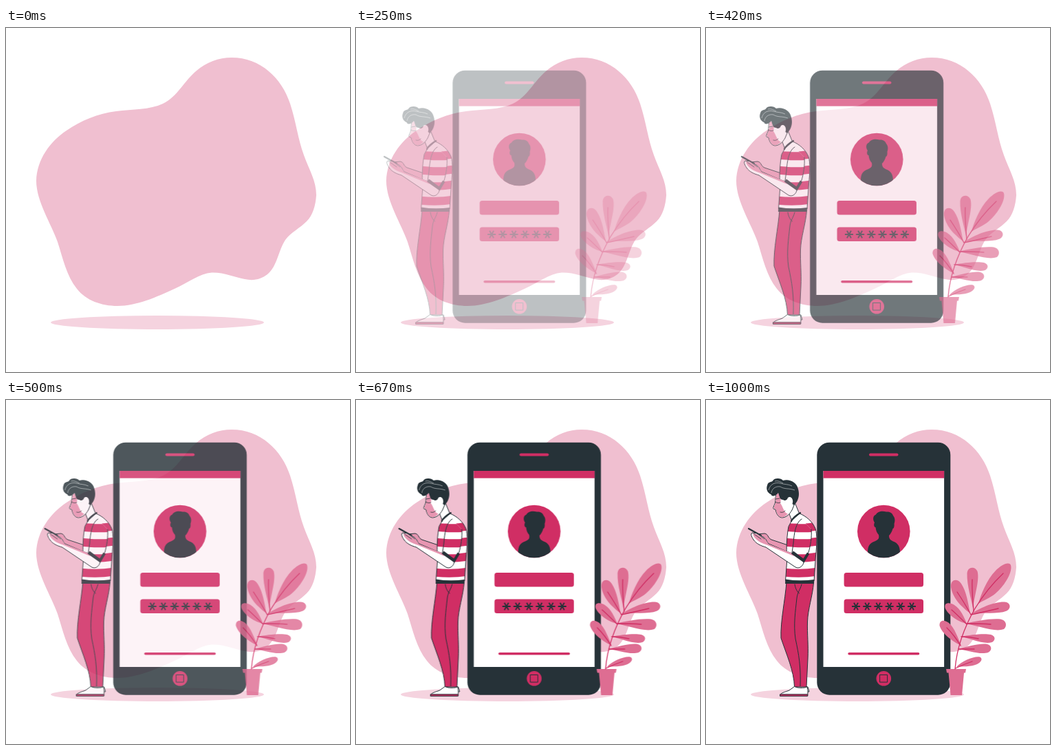
An HTML page that plays this animation: 500 px wide and 500 px high, repeating every 1.04 s.

```html
<!DOCTYPE html>
<html lang="en">
<head>
<meta charset="utf-8">
<title>Login illustration</title>
<style>
  html, body { margin: 0; width: 100%; height: 100%; overflow: hidden; background: #fff; }
  svg { display: block; width: 100vw; height: 100vh; }
  .slide { opacity: 0; }
  .pink { fill: #d02e64; }
  .dark { fill: #263238; }
  .leaf { fill: #de6d92; }
  .skin { fill: #e795b1; }
  .white { fill: #fff; }
  .line { fill: none; stroke: #263238; stroke-linecap: round; stroke-linejoin: round; }
  .thin { stroke-width: .8; }
  .thick { stroke-width: 2.2; }
  .edge { stroke: #263238; stroke-linejoin: round; }
  .vein { fill: none; stroke: #d02e64; stroke-width: 1.3; stroke-linecap: round; }
  .strand { fill: none; stroke: #fff; stroke-width: .6; opacity: .8; }
</style>
</head>
<body>
<svg viewBox="0 0 500 500">
  <defs>
    <clipPath id="avatar"><circle cx="258.3" cy="191" r="38.3"/></clipPath>
    <path id="torso" d="M125 175 L136 165 C146 169 155 177 159 187 C162 196 161 211 159.5 226 L157 263 L115.5 263 L118 229 C116 215 118 194 120 184Z"/>
    <clipPath id="shirt"><use href="#torso"/></clipPath>
    <path id="sleeve" d="M139 173 C130 178 128 195 127 208 L125 222 L142 234 L148.500 223 C152 212 154 199 153 188"/>
    <clipPath id="sleeveClip"><use href="#sleeve"/></clipPath>
    <path id="star" stroke="#263238" stroke-width="1.8" d="M-6 0H6M-3 -5.2L3 5.2M3 -5.2L-3 5.2"/>
  </defs>

  <path fill="#f0bfd0" d="M328 43 C370 43 401 73 413 110 C422 138 424 160 433 185 C441 207 451 222 451 243 C450 258 446 272 437 281 C427 291 414 297 406 308 C396 323 394 347 380 358 C371 365 360 368 347 365 C331 362 317 355 299 355.5 C281 357 265 370 245 379 C219 391 190 404 162 404 C139 404 116 396 103 379 C88 360 83 336 75 311 C66 285 44 252 44 222 C45 191 64 165 88 149 C108 135 134 124 160 121 C184 118 209 119 228 110 C249 100 258 78 277 62 C291 50 309 43 328 43Z"/>
  <ellipse cx="220" cy="428" rx="155" ry="10" fill="#f5d3df"/>

  <!-- phone -->
  <g class="slide">
    <rect class="dark" x="161.3" y="61.7" width="194" height="367" rx="18"/>
    <rect class="white" x="170.5" y="103" width="175.6" height="285"/>
    <rect class="pink" x="170.5" y="103" width="175.6" height="10.6"/>
    <rect class="pink" x="237" y="77.5" width="42.5" height="4" rx="2"/>
    <circle class="pink" cx="258.3" cy="191" r="38.3"/>
    <path class="dark" clip-path="url(#avatar)" d="M235 222 C235 212 238 208 245 205.500 C251 203 252 201 251 196 C248 193 247 189 246.500 185 C244 185 243.500 181 245 178 C242 174 242.500 168 247 166.500 C249 162 256 160.500 262 162.500 C268 162 271 165 272 168 C275.500 172 274.500 177 273.500 180 C274 184 273 187 271.500 187 C270.500 191 268 195 266 197 C266 202 268 203.500 272 205.500 C279 208 282 213 282 222 V232 H235Z"/>
    <rect class="pink" x="200.6" y="251" width="115.4" height="20.6" rx="3.5"/>
    <rect class="pink" x="200.6" y="289.5" width="115.4" height="20.6" rx="3.5"/>
    <g id="stars"></g>
    <rect class="pink" x="206.3" y="367" width="104" height="3.6" rx="1.8"/>
    <circle class="pink" cx="258.3" cy="404.8" r="10.8"/>
    <rect class="line" x="253" y="399.5" width="10.6" height="10.6"/>
  </g>

  <!-- plant -->
  <g class="slide">
    <g class="leaf">
      <path d="M396 296 C399 284 408 261 421 248 C429 240 440 234 443 240 C446 250 434 270 421 281 C413 288 403 291 396 296Z"/>
      <path d="M388 303 C386 290 379 270 379.500 252 C380 242 391 241 394.500 249 C398 262 390 284 388 303Z"/>
      <path d="M384 310 C376 304 359 291 356 272 C355 260 366 259 371 267 C379 279 381 296 384 310Z"/>
      <path d="M379 325 C367 323 351 312 347.500 302 C346 294 354 294 361 298 C370 304 375 315 379 325Z"/>
      <path d="M371 357 C360 352 343 340 339.500 328 C339 319 347 319 353 324 C362 332 366 346 371 357Z"/>
      <path d="M385 311 C397 303 418 293 434 293.500 C443 294 444 303 437 306.500 C424 312 402 308 385 311Z"/>
      <path d="M377 325 C392 321 415 317 428 318.500 C437 320 438 329 433 333 C420 338 395 328 377 325Z"/>
      <path d="M370 344 C385 341 405 339 414 341 C421 343 421 349 416 352 C403 356 383 346 370 344Z"/>
      <path d="M366 362.500 C380 358 400 353 409 355 C416 357 416 364 410 367 C398 371 380 363 366 362.500Z"/>
      <path d="M364 388 C372 379 390 372 398 373.500 C403 376 400 381 394 384 C385 388 373 387 364 388Z"/>
      <path d="M349 391 H378 L377 396.500 H375 L372 429 H355.500 L352.500 396.500 H350Z"/>
    </g>
    <path class="vein" d="M362 391 C364 366 371 338 391 303 C402 285 416 267 432 252"/>
    <path class="vein" d="M389 307 C388 292 386 275 387 261 M385 312 C378 299 371 288 365 279 M379 326 C372 319 364 311 357 305 M370 357 C364 347 357 338 350 331 M385 312 C400 309 412 306 425 303 M379 325 C390 325 402 325 414 326 M371 344 C380 344 388 345 396 347 M367 362 H390 M362.500 390 C371 386 378 383 387 380"/>
  </g>

  <!-- reader -->
  <g class="slide">
    <path class="white edge" d="M132 415 L148 417 L150 424 H133Z"/>
    <path class="pink edge" d="M117 265 L156.500 265 C155 285 148 304 147.500 322 C147 341 149 356 148 376 L146 417 L128.500 417 C128 394 117 370 109 346 C108 322 115 291 117 265Z"/>
    <path class="line" d="M129 268 C130 275 133 279 135.500 281 M139 268 C137 276 133 279 132 288 C130 307 127 326 130 347 C135 370 138 388 137 416"/>
    <path class="white edge" d="M128.500 416.500 C133 419 143 419 147 417 C148.500 421 148 427 147.500 430 H107.500 C107 426 116 424 121 422Z"/>
    <path class="pink edge" d="M107.500 427.800 H147.800 V430.300 H107.500Z"/>

    <!-- far arm and handset -->
    <path class="skin edge" d="M122 212 L95 203 C89 200 91 195 85 194 L75 195 C78 200 82 205 88 208 L122 223Z"/>
    <path class="line thick" d="M62 187 L80 197"/>

    <!-- neck and face -->
    <path class="white edge" d="M120 163 L125 176 L136 166 L129 149Z"/>
    <path class="white edge" d="M103 134 C100 139 102 146 100 151 C98 155 97 158 98.500 158.500 L101 159 C102 164 104 170 110 171 C116 171 121 167 125 160 L130 148 L123 133Z"/>
    <path class="skin" d="M103 136 C100.800 140 102.300 147 100.500 151.500 C99 155 98 157 99 158 L101.500 158.700 C102.500 164 104.500 169.500 110 170.400 C114 170.500 117 168 119 165.500 C113 164 112 155 108 150 C109 145 109 140 109 135Z"/>
    <path class="line thin" d="M101 148 C103 150 106 150 108 149 M101 144 L107 143 M108 163 C111 164 113 163 115 161"/>
    <path class="dark" d="M105 135 C101 140 95 141 94.500 137 C89 135 87 129 89 124 C90.500 118 95 120 97 117.500 C99 113 109 113 112 117 C121 114 132 120 133.500 128 C137 138 134 147 128 153 L125.500 151 C128 144 123 139 119 142 C118 146 114 147 112 145 C107 145 107 140 105 135Z"/>
    <path class="strand" d="M91 131 C93 122 101 119 108 121 C114 123 119 122 125 125 M95 135 C96 128 102 125 108 126 C114 130 121 128 129 131 M100 118 C105 117 108 119 112 121"/>

    <!-- shirt -->
    <use href="#torso" class="white"/>
    <g clip-path="url(#shirt)"><g id="bodyStripes" class="pink"></g></g>
    <use href="#torso" class="line"/>
    <path class="dark" d="M115.500 260.500 C129 263 144 263 157.300 261 L157 267 H115Z"/>
    <path class="line thick" d="M124 176 C126 171 132 167 137 164"/>

    <!-- near arm -->
    <path class="white edge" d="M67 193 C64 195 67 200 69 203 C73 209 80 212 87 214 L130 243 C136 246 141 241 142 236 L145 226 L122 222 L91 209 C88 206 88 202 83 199 L74 194Z"/>
    <path class="skin" d="M68 194 C69 201 77 207 87 210 L128 227 L126 223 L91 209.500 C88 206 87 202 82 199.500 L74 195Z"/>
    <path class="line thin" d="M70 195 L80 202 M74 194 L85 202"/>
    <use href="#sleeve" class="white"/>
    <g clip-path="url(#sleeveClip)"><g id="sleeveStripes" class="pink"></g></g>
    <path class="dark" d="M127 219.500 L141.500 230.500 L147 221.500 L150 224 L142.500 236.500 L124 223.500Z"/>
    <use href="#sleeve" class="line"/>
  </g>
</svg>
<script>
  const SVG = 'http://www.w3.org/2000/svg';
  const add = (id, tag, attrs) => {
    const el = document.createElementNS(SVG, tag);
    for (const key in attrs) el.setAttribute(key, attrs[key]);
    document.getElementById(id).append(el);
  };

  for (let i = 0; i < 6; i++) {
    add('stars', 'use', { href: '#star', x: 218 + i * 16.2, y: 300 });
  }

  // Gently bowed bands, repeated down the cloth.
  const stripe = (id, y, h, tilt) => add(id, 'path', {
    d: `M110 ${y} Q138 ${y + 4} 166 ${y - tilt} v${h} Q138 ${y + h + 4} 110 ${y + h}Z`
  });
  for (let i = 0; i < 4; i++) {
    stripe('bodyStripes', 178 + i * 22, 12, 1);
    stripe('sleeveStripes', 178 + i * 22, 12, -1);
  }

  const LOOP = 1040, FPS = 24, START = 80;
  const slides = [...document.querySelectorAll('.slide')].map(el => {
    const anim = el.animate([
      { opacity: 0, transform: 'translateX(-30px)' },
      { opacity: 1, transform: 'translateX(0)' }
    ], { duration: 1000, easing: 'cubic-bezier(.36, -.01, .5, 1.38)', fill: 'both' });
    anim.pause();
    return anim;
  });

  const origin = performance.now();
  function draw() {
    const t = (performance.now() - origin) % LOOP;
    // Poses advance 24 times a second; the first one stays empty.
    const step = Math.floor((t + 5) * FPS / 1000) + 1;
    const time = t < START ? 0 : Math.min(1000, step * 1000 / FPS);
    for (const anim of slides) anim.currentTime = time;
    requestAnimationFrame(draw);
  }
  draw();
</script>
</body>
</html>
```
